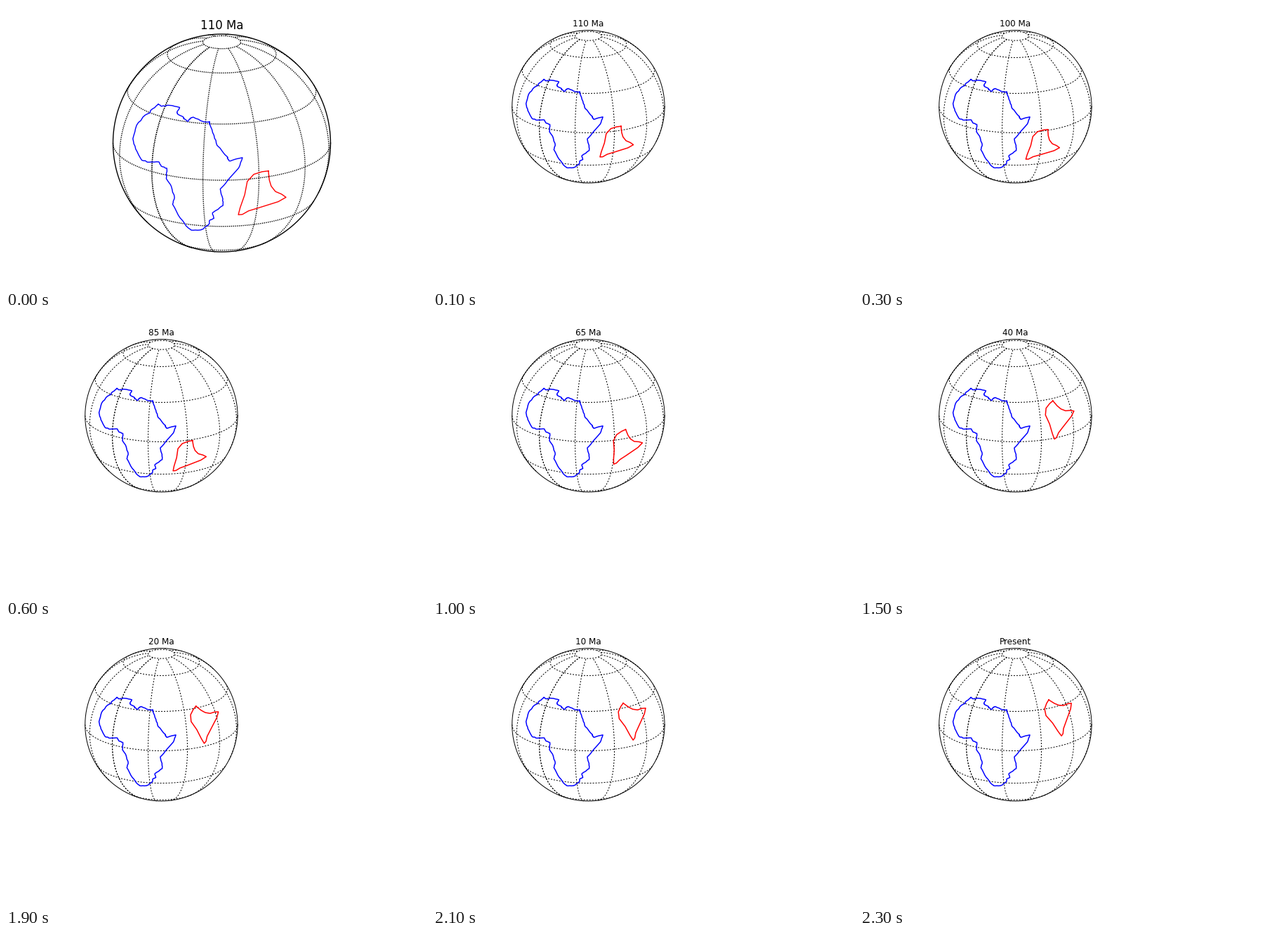
A matplotlib script that plays this animation: 600x400 px, repeating every 2400 ms.

```python
import numpy as np
import matplotlib.pyplot as plt
from matplotlib.animation import FuncAnimation

W, H, DPI = 600, 400, 100
LON0, LAT0 = np.radians([40, 20])

AFRICA = [
    (-5.9, 35.8), (-2.9, 35.2), (3, 36.9), (11, 37), (10.1, 34.2),
    (11.2, 33.2), (15.3, 32.2), (15.8, 31.3), (19, 30.3), (20, 32.2),
    (21.7, 32.9), (29, 30.9), (32.5, 31.2), (32.6, 29.9), (35.5, 24),
    (37.4, 18.7), (43.1, 12.6), (43.2, 11.5), (44.5, 10.4), (51.2, 11.9),
    (49, 6.5), (43, -.3), (39.2, -5), (40.6, -11), (40.7, -15), (34.8, -20),
    (35.5, -23.8), (32.8, -25.6), (32.6, -28), (28, -33), (25.6, -34),
    (20, -34.8), (18.3, -33), (14.9, -26), (11.8, -17), (13.6, -12.3),
    (12.2, -6), (9.3, -2), (9.6, 3.8), (6, 4.3), (4.4, 6.3), (-2, 4.7),
    (-7.5, 4.4), (-13.3, 9), (-17.2, 13.5), (-17, 21), (-12.9, 27.8),
    (-9.8, 29.8), (-9.8, 31.4)]

INDIA = [
    (72.9, 36.3), (77.4, 32.7), (81.2, 30.5), (86.3, 29.1), (91.8, 29.2),
    (96.6, 28.4), (92.9, 24.7), (83.8, 16.8), (80.3, 12.5), (79.2, 8.8),
    (77.6, 7.4), (74.9, 11.4), (71, 18.6), (66.3, 25), (66.3, 30.1),
    (69.6, 34)]

# Rotation of India to Africa: age, pole latitude, pole longitude, angle
POLES = np.array([
    (0, 22, 33, 0), (10, 23.8, 33.1, -4.6), (20, 29.6, 23.9, -7.5),
    (30, 22.5, 38.5, -13.3), (40, 25.5, 42.7, -17.4), (50, 24.1, 34.2, -23.5),
    (60, 19.5, 25.2, -34.4), (65, 19, 21.9, -40.2), (70, 20.5, 18.9, -44.4),
    (80, 22.3, 18.2, -49.1), (90, 20, 27.5, -58.8), (110, 22.6, 30.3, -54.9)])

# centre x, centre y, radius, pixels per point, coast width, dash, title pad
LARGE = (307.5, 195, 155, DPI / 72, 1, 1, 5)
SMALL = (221.4, 143.3, 108.7, 1, 1.5, 2, 6)


def to_xyz(lon, lat):
    lon, lat = np.radians(lon), np.radians(lat)
    return np.array([np.cos(lat) * np.cos(lon), np.cos(lat) * np.sin(lon),
                     np.sin(lat) + 0 * lon])


def drift(p, age):
    """Turn points about the rotation pole for the given age."""
    lat, lon, angle = (np.interp(age, POLES[:, 0], c) for c in POLES.T[1:])
    k, a = to_xyz(lon, lat), np.radians(angle)
    return (p * np.cos(a) + np.cross(k, p.T).T * np.sin(a)
            + np.outer(k, k @ p) * (1 - np.cos(a)))


def project(p):
    """Orthographic view; the far side becomes NaN."""
    x, y, z = p
    east = y * np.cos(LON0) - x * np.sin(LON0)
    out = x * np.cos(LON0) + y * np.sin(LON0)
    north = z * np.cos(LAT0) - out * np.sin(LAT0)
    depth = z * np.sin(LAT0) + out * np.cos(LAT0)
    return np.where(depth >= 0, [east, north], np.nan)


def outline(points, n=1, amp=0):
    """Closed outline, each side split in n parts and jittered like a coast."""
    rng = np.random.default_rng(4)
    pts = np.array(points + points[:1], float)
    k = np.arange((len(pts) - 1) * n + 1)
    fine = np.array([np.interp(k / n, range(len(pts)), c) for c in pts.T])
    fine += rng.uniform(-amp, amp, fine.shape) * (k % n > 0)
    return to_xyz(*fine)


def graticule():
    lon = np.linspace(-140, 220, 721)
    lat = np.linspace(-80, 80, 321)
    rows = [to_xyz(lon, v) for v in (*range(-60, 61, 30), 80)]
    # 0 and 360 degrees coincide, which darkens that meridian
    cols = [to_xyz(np.full_like(lat, v), lat) for v in range(0, 361, 30)]
    return [project(p) for p in rows + cols]


GRID = graticule()
AFRICA_XY = project(outline(AFRICA, 4, .25))
INDIA_XYZ = outline(INDIA)
TURN = np.linspace(0, 2 * np.pi, 361)
RIM = np.array([np.cos(TURN), np.sin(TURN)])
AGES = [110, *range(110, -1, -5)]

fig = plt.figure(figsize=(W / DPI, H / DPI), dpi=DPI, facecolor="white")
ax = fig.add_axes([0, 0, 1, 1])


def draw(i):
    ax.clear()
    ax.set_xlim(0, W)
    ax.set_ylim(H, 0)
    ax.axis("off")
    cx, cy, r, px, coast, dash, pad = SMALL if i else LARGE
    pt = px * 72 / DPI

    def line(xy, color, width, **kw):
        ax.plot(cx + r * xy[0], cy - r * xy[1], color=color, lw=width * pt,
                **kw)

    for xy in GRID:
        line(xy, "black", 1, dashes=(dash, dash), dash_capstyle="butt")
    line(RIM, "black", 1)
    line(AFRICA_XY, "blue", coast)
    age = AGES[i]
    line(project(drift(INDIA_XYZ, age)), "red", coast)
    ax.text(cx, cy - r - pad * px, f"{age} Ma" if age else "Present",
            ha="center", va="baseline", fontsize=12 * pt,
            family="DejaVu Sans")
    return []


anim = FuncAnimation(fig, draw, frames=len(AGES), interval=100,
                     init_func=lambda: [], repeat=True, repeat_delay=0)
plt.show()
```
